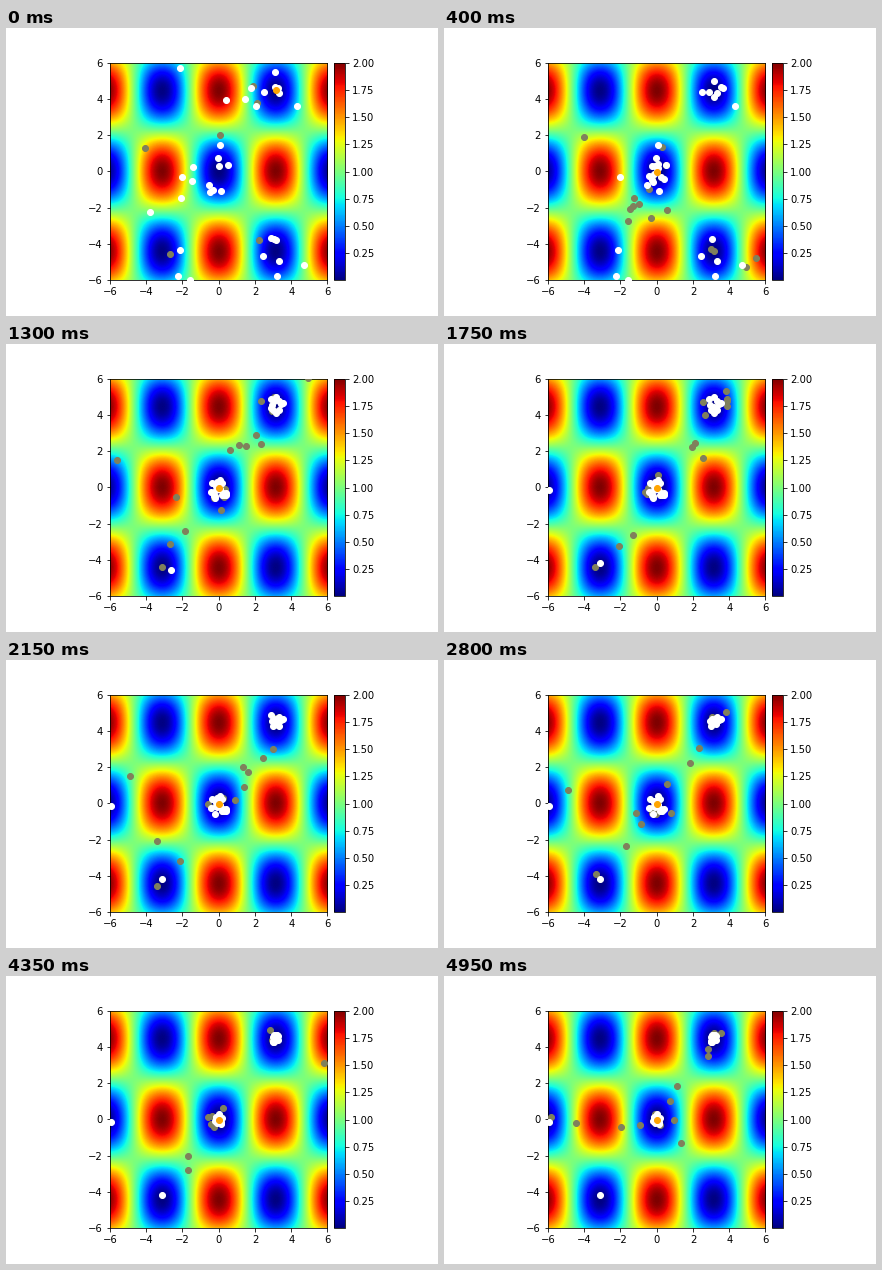
These frames come from a looping animation (432 by 288 pixels, 5000 ms). A matplotlib script:

```python
import numpy as np
import matplotlib.pyplot as plt
from matplotlib.animation import FuncAnimation

W, H, DPI = 432, 288, 72
FRAMES, STEP = 100, 50
LIM = 6

# Valleys of the function inside the plot
CENTRE, UPPER, LOWER = (0, -.05), (3.15, 4.5), (-3.1, -4.45)
RIGHT, LEFT, EDGE = (3.1, -4.45), (-3.1, 4.45), (-6.05, -.1)

WIDE, TIGHT = (.5, .65), (.2, .36)


def griewank(x, y):
    return 1 + (x**2 + y**2) / 4000 - np.cos(x) * np.cos(y / np.sqrt(2))


def around(homes, radii, rng):
    """Random points in an ellipse around each home."""
    n = len(homes)
    angle, r = rng.uniform(0, 2 * np.pi, n), np.sqrt(rng.random(n))
    return homes + np.c_[r * np.cos(angle), r * np.sin(angle)] * radii


# Each member jumps from a scattered start into a valley, then closer in.
rng = np.random.default_rng(7)
starts = np.repeat([CENTRE, UPPER, LOWER, RIGHT, LEFT], [12, 10, 4, 7, 1],
                   axis=0)
homes = np.repeat([CENTRE, UPPER, LOWER, EDGE], [20, 11, 1, 2], axis=0)
stages = np.array([
    np.clip(starts + rng.normal(0, 1.1, starts.shape), -LIM, LIM),
    around(homes, WIDE, rng),
    around(homes, TIGHT, rng),
])
members = np.arange(len(homes))
settle = rng.integers(2, 17, len(homes))
tighten = rng.integers(20, 85, len(homes))


def population(i):
    stage = (i >= settle).astype(int) + (i >= tighten)
    return stages[stage, members]


def trial_points(i):
    """Rejected trials: a member plus part of the gap between two others."""
    rng = np.random.default_rng(100 + i)
    count = min(10 + i, 22) - i // 12
    pool = population(i)
    base, a, b = pool[rng.integers(len(pool), size=(3, count))]
    scale = rng.uniform(.1, .9, (count, 1))
    return base + scale * (a - b) + rng.normal(0, .25, (count, 2))


fig = plt.figure(figsize=(W / DPI, H / DPI), dpi=DPI, facecolor="white")
side, bottom = 217.44, 36
ax = fig.add_axes([104 / W, bottom / H, side / W, side / H])
cax = fig.add_axes([328.14 / W, bottom / H, side / 20 / W, side / H])

grid = np.linspace(-LIM, LIM, 240)
heat = ax.imshow(griewank(*np.meshgrid(grid, grid)), cmap="jet",
                 origin="lower", extent=[-LIM, LIM, -LIM, LIM],
                 interpolation="bilinear", aspect="auto")
ax.set(xlim=(-LIM, LIM), ylim=(-LIM, LIM))
for axis in (ax.xaxis, ax.yaxis):
    axis.set_ticks(range(-LIM, LIM + 1, 2))
fig.colorbar(heat, cax=cax, ticks=np.arange(.25, 2.01, .25))


def dots(color, z):
    return ax.plot([], [], "o", color=color, markersize=6, zorder=z)[0]


gray, white, orange = dots("#80805c", 3), dots("white", 4), dots("orange", 5)


def draw(i):
    gray.set_data(*trial_points(i).T)
    white.set_data(*population(i).T)
    x, y = UPPER if i < 5 else CENTRE
    orange.set_data([x], [y])
    return gray, white, orange


anim = FuncAnimation(fig, draw, frames=FRAMES, interval=STEP, repeat=True,
                     repeat_delay=0)
plt.show()
```
